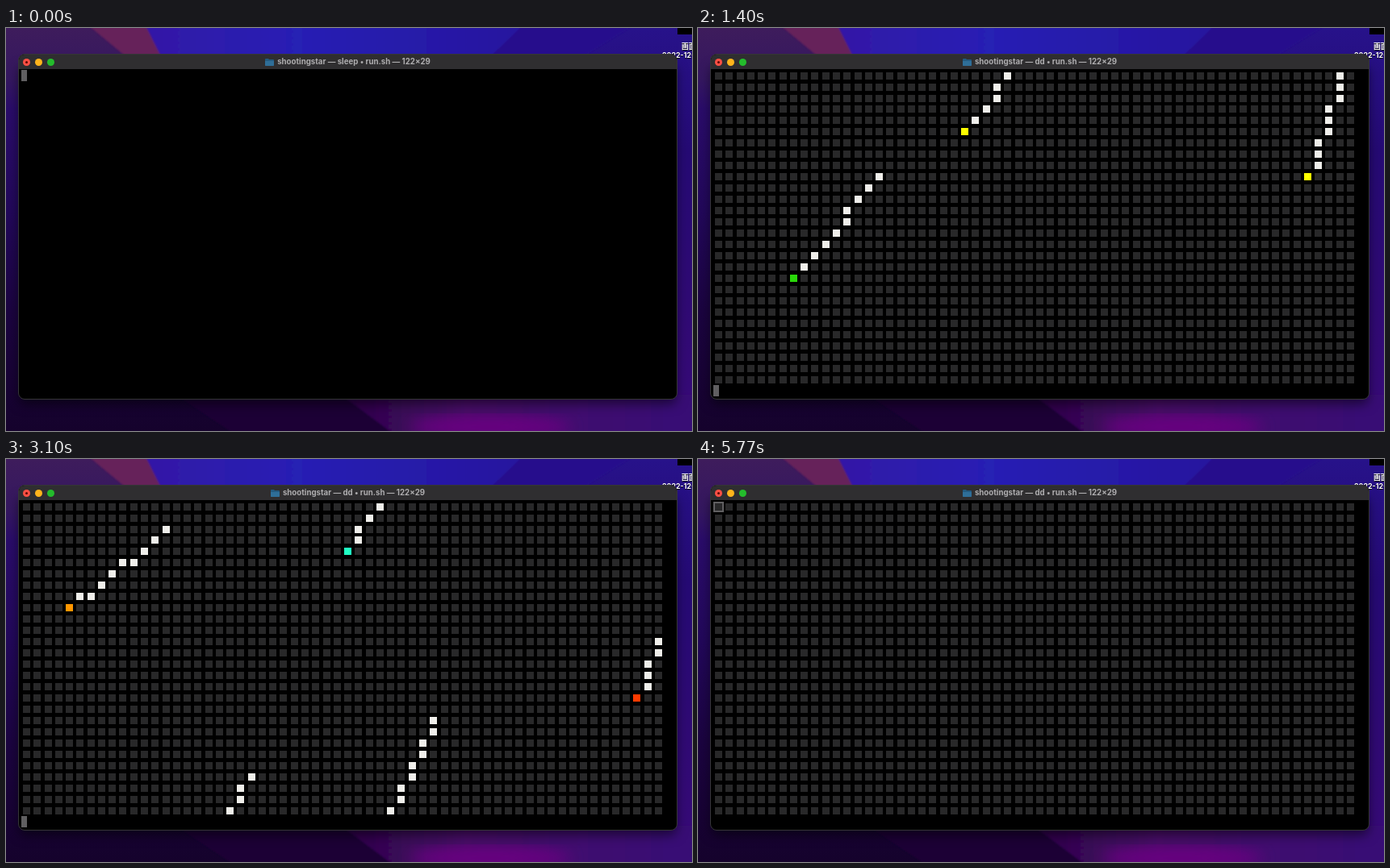
These frames come from a looping animation (850 by 500 pixels, 5810 ms). An HTML page with a canvas:

```html
<!DOCTYPE html>
<html lang="en">
<head>
<meta charset="utf-8">
<title>Shooting stars in a terminal</title>
<style>
  html, body { margin: 0; width: 100%; height: 100%; overflow: hidden; background: #000; }
  #stage { position: relative; width: 850px; height: 500px; overflow: hidden; }
  #stage > svg, canvas { position: absolute; left: 0; top: 0; }
  .label {
    position: absolute; color: #fff; white-space: nowrap;
    font: bold 8.8px/10px Inter, "Noto Sans CJK JP", "Noto Sans CJK", sans-serif;
    text-shadow: 0 1px 1px #000;
  }
  .file { position: absolute; left: 832px; top: 0; width: 18px; height: 8px; background: #000; }
  .window {
    position: absolute; left: 15px; top: 32px; width: 815px; height: 427px;
    border: 1px solid #363638; border-radius: 8px; background: #000; overflow: hidden;
  }
  .shadow {
    position: absolute; left: 16px; top: 40px; width: 815px; height: 420px;
    border-radius: 8px; box-shadow: 0 7px 14px rgba(0, 0, 0, .5);
  }
  .bar { height: 18px; background: #2f2e30; }
  .bar i { position: absolute; top: 4.5px; width: 9px; height: 9px; border-radius: 50%; }
  .bar i::after {
    content: ""; position: absolute; left: 3px; top: 3px; width: 3px; height: 3px; border-radius: 50%;
  }
  .close { left: 5px; background: #ff4f44; }
  .close::after { background: #5c0800; }
  .mini { left: 20px; background: #ffb41c; }
  .zoom { left: 34.5px; background: #24bc2c; }
  .title {
    display: flex; justify-content: center; align-items: center; gap: 4px; height: 18px;
    font: bold 9.7px/18px Inter, Roboto, sans-serif; color: #aeadaf; white-space: pre;
  }
</style>
</head>
<body>
<div id="stage">
  <svg width="850" height="500" viewBox="0 0 850 500">
    <defs>
      <linearGradient id="left" x2="0" y2="1">
        <stop offset="0" stop-color="#3e1c5c"/>
        <stop offset=".13" stop-color="#341760"/>
        <stop offset=".2" stop-color="#2a0c6a"/>
        <stop offset=".45" stop-color="#22085a"/>
        <stop offset=".7" stop-color="#1b0440"/>
        <stop offset="1" stop-color="#15022c"/>
      </linearGradient>
      <linearGradient id="right" x2="0" y2="1">
        <stop offset="0" stop-color="#27128a"/>
        <stop offset=".3" stop-color="#250a74"/>
        <stop offset=".7" stop-color="#300a74"/>
        <stop offset="1" stop-color="#380a78"/>
      </linearGradient>
      <linearGradient id="sky">
        <stop offset="0" stop-color="#3218a6"/>
        <stop offset=".4" stop-color="#2820b4"/>
        <stop offset="1" stop-color="#27159e"/>
      </linearGradient>
      <linearGradient id="low">
        <stop offset="0" stop-color="#2c0648"/>
        <stop offset=".35" stop-color="#480868"/>
        <stop offset="1" stop-color="#360a76"/>
      </linearGradient>
      <filter id="soft"><feGaussianBlur stdDeviation="1"/></filter>
      <filter id="glow"><feGaussianBlur stdDeviation="9"/></filter>
    </defs>
    <rect width="425" height="500" fill="url(#left)"/>
    <rect x="425" width="425" height="500" fill="url(#right)"/>
    <g filter="url(#soft)">
      <path d="M100-5H180L196 45H160Z" fill="#66205a"/>
      <path d="M172-5H645L590 45H197Z" fill="url(#sky)"/>
      <path d="M642-5H780L700 45H590Z" fill="#28108c"/>
      <path d="M210 455H420L482 505H285Z" fill="#1d0336"/>
      <path d="M415 455H860V505H482Z" fill="url(#low)"/>
    </g>
    <ellipse cx="600" cy="495" rx="100" ry="14" fill="#680480" filter="url(#glow)"/>
  </svg>

  <div class="file"></div>
  <div class="label" style="left:837px;top:18px">画面収録</div>
  <div class="label" style="left:813px;top:29px">2022-12-</div>

  <div class="shadow"></div>
  <div class="window">
    <div class="bar">
      <i class="close"></i><i class="mini"></i><i class="zoom"></i>
      <div class="title">
        <svg width="11" height="9" viewBox="0 0 11 9">
          <path d="M0 1Q0 0 1 0H4L5 1H10Q11 1 11 2V8Q11 9 10 9H1Q0 9 0 8Z" fill="#235a80"/>
          <path d="M0 3H11V8Q11 9 10 9H1Q0 9 0 8Z" fill="#2f6e98"/>
        </svg>
        <span id="title"></span>
      </div>
    </div>
  </div>
  <canvas id="screen" width="850" height="500"></canvas>
</div>

<script>
const LOOP = 5810, GRID_ON = 100, HOME_AT = 5770;
const STEP = 50.5, STEP_ZERO = 1363.6;
const COLS = 60, ROWS = 28, TRAIL = 9;
const DIM = "#282829", PALE = "#efeeea", CURSOR = "#605f61";

// Each star enters at tick `start` from (x, y) and moves by (-dx, dy) per tick.
const star = (start, color, x, dx, y = 0.5, dy = 1) => ({ start, color, x, dx, y, dy });
const stars = [
  star(-18, "#2ad80a", 22.92, 0.8333),
  star(-9, "#ffff00", 58.88, 0.353),
  star(-5, "#ffff00", 27.83, 0.8667),
  star(1, "#2aff5c", 38.125, 0.695),
  star(6, "#2af0b0", 48.25, 0.5),
  star(17, "#ff3a00", 63.88, 0.35),
  star(22, "#ff9600", 16.5, 1, 0.62, 0.75),
  star(30, "#20ffc4", 33.35, 0.7),
];

const ctx = document.getElementById("screen").getContext("2d");
const title = document.getElementById("title");

function block(x, y, w, h, color) {
  ctx.fillStyle = color;
  ctx.fillRect(x, y, w, h);
}

function cell(col, row, color) {
  if (col < 0 || col >= COLS || row < 0 || row >= ROWS) return;
  block(Math.round(21 + 13.27 * col), Math.round(54.6 + 13.96 * row), 9, 9, color);
}

function drawStar(s, tick) {
  const head = tick - s.start;
  for (let n = Math.max(0, head - TRAIL); n <= head; n++) {
    const col = Math.floor(s.x - s.dx * n), row = Math.floor(s.y + s.dy * n);
    cell(col, row, n === head ? s.color : PALE);
  }
}

function draw(t) {
  const running = t >= GRID_ON;
  const text = `shootingstar — ${running ? "dd" : "sleep"} • run.sh — 122×29`;
  if (title.textContent !== text) title.textContent = text;

  ctx.clearRect(0, 0, 850, 500);
  if (!running) return block(19, 52, 7, 14, CURSOR);

  if (t >= HOME_AT) block(19, 53, 13, 13, CURSOR);
  else block(19, 443, 7, 14, CURSOR);

  for (let row = 0; row < ROWS; row++)
    for (let col = 0; col < COLS; col++) cell(col, row, DIM);

  const tick = Math.floor((t - STEP_ZERO) / STEP);
  for (const s of stars) drawStar(s, tick);
}

const begin = performance.now();
function frame() {
  draw((performance.now() - begin) % LOOP);
  requestAnimationFrame(frame);
}
frame();
</script>
</body>
</html>
```
